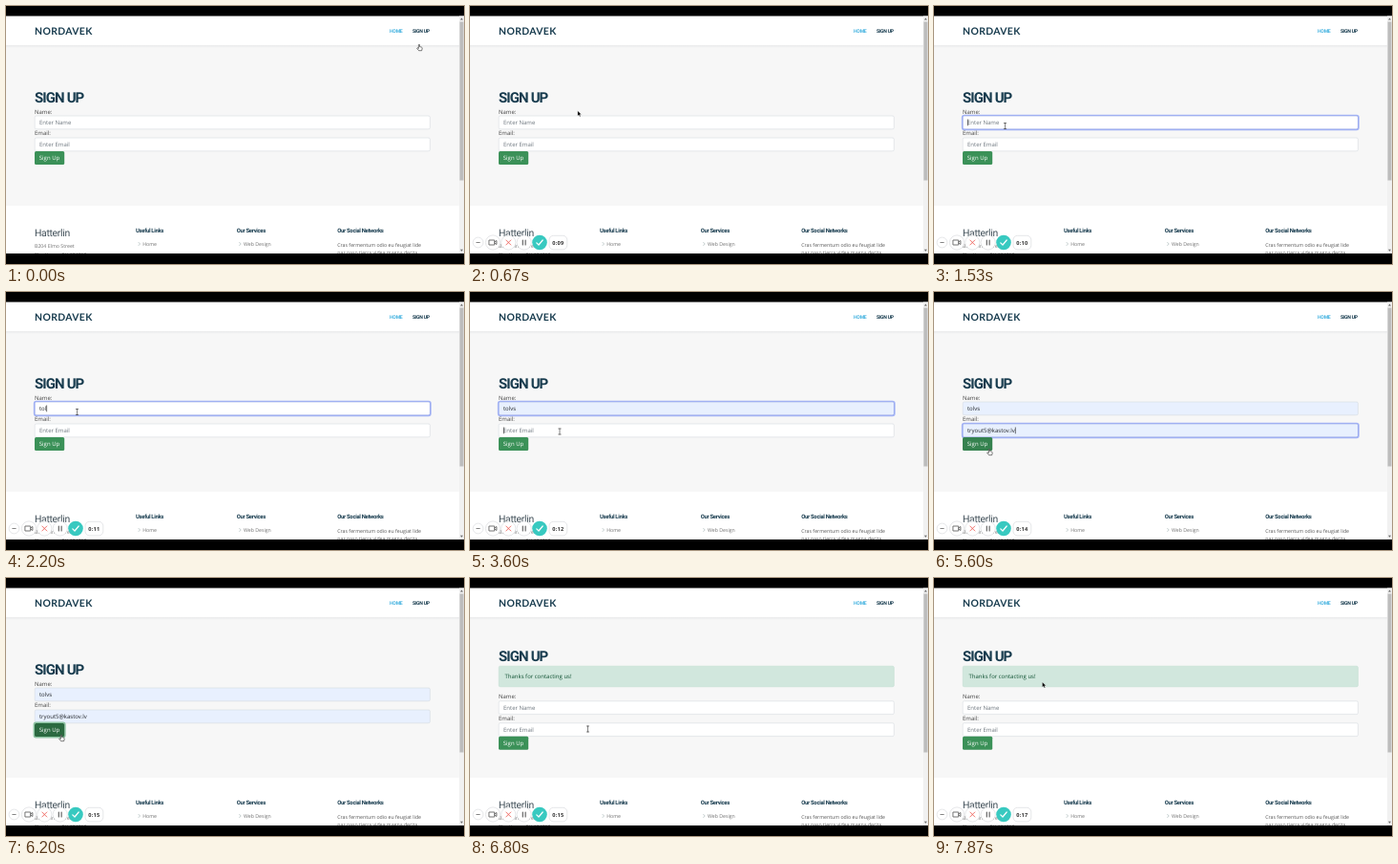
Recreate the animation shown at these times as an HTML page. Size 480 by 270 pixels, loop 8000 ms.

```html
<!DOCTYPE html>
<html lang="en">
<head>
<meta charset="utf-8">
<title>Sign up form</title>
<style>
html, body { margin: 0; height: 100%; overflow: hidden; background: #000; }
svg { display: block; width: 100%; height: 100%; text-rendering: geometricPrecision; }
text { font: 6px "Open Sans", sans-serif; fill: #444; }
.round { font-family: Roboto, sans-serif; font-weight: 700; letter-spacing: -.06em; fill: #173b4e; }
text.nav { font-size: 5.2px; }
text.small { font-size: 5.22px; fill: #707070; }
text.hint { fill: #6c757d; }
text.value { fill: #212529; }
.field { fill: #fff; stroke: #ced4da; stroke-width: .5; }
.ring { fill: none; stroke: #5472f5; stroke-opacity: .5; stroke-width: 1.7; }
.chip { fill: #fff; stroke: #d4d6d9; stroke-width: .6; }
.line { fill: none; stroke-width: .9; stroke-linecap: round; stroke-linejoin: round; }
.caret { fill: #111; }
</style>
</head>
<body>
<svg viewBox="0 0 480 270">
  <defs>
    <linearGradient id="shade" x2="0" y2="1">
      <stop stop-color="#e9eaeb"/><stop offset="1" stop-color="#f7f7f7"/>
    </linearGradient>
  </defs>

  <!-- page -->
  <rect width="480" height="270"/>
  <rect y="10.5" width="480" height="248.5" fill="#fff"/>
  <rect y="41" width="475" height="168" fill="#f7f7f7"/>
  <rect y="41" width="475" height="3" fill="url(#shade)"/>
  <text x="30" y="29.8" style="font:700 10.4px Lato,sans-serif;letter-spacing:.37px;fill:#173b4e">NORDAVEK</text>
  <text class="round nav" x="402" y="27.7" style="fill:#45b3e0">HOME</text>
  <text class="round nav" x="426" y="27.7">SIGN UP</text>

  <!-- form -->
  <text id="title" class="round" x="30" style="font-size:15px">SIGN UP</text>
  <g id="alert">
    <rect x="30.2" y="92.2" width="414.2" height="21.6" rx="1.5" fill="#d1e7dd" stroke="#badbcc" stroke-width=".5"/>
    <text x="36.5" y="105.2" style="fill:#0f5132">Thanks for contacting us!</text>
  </g>
  <g id="form">
    <text x="30" y="112.6">Name:</text>
    <rect id="nameBox" class="field" x="30.2" y="115" width="414.2" height="13.8" rx="1.5"/>
    <rect id="nameRing" class="ring" x="29.7" y="114.5" width="415.2" height="14.8" rx="2"/>
    <text id="nameHint" class="hint" x="35" y="124.1">Enter Name</text>
    <text id="name" class="value" x="35" y="124.1"></text>
    <rect id="nameCaret" class="caret" y="118.5" width=".6" height="6.8"/>
    <text x="30" y="135.4">Email:</text>
    <rect id="mailBox" class="field" x="30.2" y="138" width="414.2" height="13.8" rx="1.5"/>
    <rect id="mailRing" class="ring" x="29.7" y="137.5" width="415.2" height="14.8" rx="2"/>
    <text id="mailHint" class="hint" x="35" y="147.1">Enter Email</text>
    <text id="mail" class="value" x="35" y="147.1"></text>
    <rect id="mailCaret" class="caret" y="141.5" width=".6" height="6.8"/>
    <rect id="buttonRing" x="29.3" y="151.3" width="32.6" height="15.4" rx="2.2" fill="none" stroke="#8cc3a1" stroke-width="1.5"/>
    <rect id="button" x="30" y="152" width="31.2" height="14" rx="1.5"/>
    <text x="34.8" y="161.2" style="fill:#fff">Sign Up</text>
  </g>

  <!-- footer -->
  <text x="30" y="241" style="font:400 10.4px Roboto,sans-serif;letter-spacing:-.03em;fill:#3d4c55">Hatterlin</text>
  <text class="small" x="30" y="253">B204 Elmo Street</text>
  <text class="small" x="30" y="261.8">Elm Haven, EH 604818</text>
  <text class="round" x="136" y="236.8">Useful Links</text>
  <text class="round" x="241.8" y="236.8">Our Services</text>
  <text class="round" x="347.3" y="236.8">Our Social Networks</text>
  <path class="line" d="M139 247.4l1.5 1.6-1.5 1.6M244.7 247.4l1.5 1.6-1.5 1.6" stroke="#9aa" style="stroke-width:.6"/>
  <text class="small" x="143.2" y="251">Home</text>
  <text class="small" x="249" y="251">Web Design</text>
  <text class="small" x="347.3" y="251.8" style="fill:#555">Cras fermentum odio eu feugiat lide</text>
  <text class="small" x="347.3" y="259.8" style="fill:#555">par naso tierra videa magna derita</text>
  <rect y="259" width="480" height="11"/>

  <!-- scrollbar -->
  <rect x="475" y="10.5" width="5" height="248.5" fill="#f1f1f1"/>
  <rect x="475.5" y="16.5" width="4" height="166" fill="#bdbdbd"/>
  <path d="M476 14.6h3l-1.5-2zM476 254.8h3l-1.5 2z" fill="#666"/>

  <!-- recorder bar -->
  <g id="bar">
    <circle class="chip" cx="8.5" cy="247.5" r="5.4"/>
    <circle class="chip" cx="24" cy="247.5" r="7.6"/>
    <circle class="chip" cx="40.3" cy="247.5" r="7.6"/>
    <circle class="chip" cx="56.7" cy="247.5" r="7.6"/>
    <circle cx="73" cy="247.5" r="7.8" fill="#38c9c0"/>
    <rect class="chip" x="83" y="240.3" width="18.8" height="14.6" rx="4.5"/>
    <path class="line" d="M6.8 247.5h3.4" stroke="#777"/>
    <path class="line" d="M20.3 245h5.4v5h-5.4zM25.7 247l2.2-1.5v4l-2.2-1.5" stroke="#666"/>
    <path class="line" d="M37.8 245l5 5m0-5l-5 5" stroke="#f0645c"/>
    <path class="line" d="M55.3 245v5m2.8-5v5" stroke="#666" style="stroke-width:1.2"/>
    <path class="line" d="M69.8 247.8l2.2 2.2 4.2-5" stroke="#fff" style="stroke-width:1.2"/>
    <text id="clock" x="92.4" y="249.6" text-anchor="middle" style="font-size:5.6px;font-weight:700;letter-spacing:.3px;fill:#333"></text>
  </g>

  <!-- pointers, hot spot at 0,0 -->
  <g id="pointer">
    <path id="arrow" d="M0 0v5.3l1.3-1.1.9 1.9.9-.4-.9-1.9h1.7z" fill="#000" stroke="#fff" stroke-width=".3"/>
    <path id="beam" class="line" d="M-1.2-3h2.4M0-3v6M-1.2 3h2.4" stroke="#333" style="stroke-width:.6"/>
    <path id="hand" d="M-.6 0q.6-.6 1.1 0v2.1l2 .5q.8.3.7 1.2l-.5 2.4h-3.1l-1.9-2.4q.1-.7.9-.4l.8.6z" fill="#fff" stroke="#222" stroke-width=".6"/>
  </g>
</svg>

<script>
const $ = id => document.getElementById(id);
const show = (id, on) => $(id).style.display = on ? '' : 'none';
const clamp = v => Math.max(0, Math.min(1, v));
const ramp = (t, start) => clamp((t - start) / 150);

const LOOP = 8000, FOCUS_NAME = 1270, FOCUS_MAIL = 3600, PRESS = 5930, RELOAD = 6350;
const USER = 'tolvs', MAIL = 'tryout5@kastov.lv';
const KEYS = [1870, 2130, 2200, 2600, 2800];

// time, x, y, pointer shape until the next point
const PATH = [
  [0, 433, 40.5, 'hand'], [70, 433, 40.5, 'arrow'], [800, 84, 116, 'beam'],
  [870, 79, 122, 'beam'], [1000, 79, 122, 'beam'], [1130, 74.5, 125.5, 'beam'],
  [3130, 74.5, 125.5, 'beam'], [3580, 94, 146, 'beam'], [4530, 94, 146, 'beam'],
  [4660, 85, 188, 'beam'], [4730, 85, 188, 'arrow'], [5330, 57, 163, 'hand'],
  [5600, 58, 164.5, 'hand'], [6600, 58, 164.5, 'arrow'], [6700, 90, 161, 'beam'],
  [6800, 123.5, 158, 'beam'], [6930, 122, 150, 'arrow'], [7470, 125, 108, 'arrow'],
  [7800, 125, 111, 'arrow'], [7860, 113.5, 109, 'arrow'], [LOOP, 113.5, 109, 'arrow']
];

function movePointer(t) {
  const i = PATH.findIndex(p => p[0] > t);
  const [t0, x0, y0, shape] = PATH[i - 1], [t1, x1, y1] = PATH[i];
  const p = (t - t0) / (t1 - t0), e = p * p * (3 - 2 * p);
  $('pointer').setAttribute('transform', `translate(${x0 + (x1 - x0) * e} ${y0 + (y1 - y0) * e})`);
  for (const id of ['arrow', 'beam', 'hand']) show(id, id === shape);
}

function drawField(id, text, filled, ring, caretOn) {
  $(id).textContent = text;
  show(id + 'Hint', !text);
  $(id + 'Box').style.fill = filled ? '#e8f0fe' : '#fff';
  $(id + 'Ring').style.opacity = ring;
  show(id + 'Caret', caretOn);
  $(id + 'Caret').setAttribute('x', 35.2 + (text ? $(id).getComputedTextLength() : 0));
}

// the caret restarts its blink at each listed time
function blink(t, from, to, resets) {
  const last = [from, ...resets].filter(r => r <= t).pop();
  return t >= from && t < to && (t - last) % 1060 < 530;
}

function draw(t) {
  const done = t >= RELOAD;
  $('title').setAttribute('y', done ? 87.4 : 101.4);
  $('form').setAttribute('transform', `translate(0 ${done ? 13.8 : 0})`);
  show('alert', done);

  const typed = done ? '' : USER.slice(0, KEYS.filter(k => k <= t).length);
  drawField('name', typed, t >= 3200 && !done,
    ramp(t, FOCUS_NAME) * (1 - ramp(t, FOCUS_MAIL)),
    blink(t, FOCUS_NAME, FOCUS_MAIL, KEYS));

  const filled = t >= 3930 && !done;
  drawField('mail', filled ? MAIL : '', filled,
    ramp(t, FOCUS_MAIL) * (1 - ramp(t, PRESS)),
    blink(t, FOCUS_MAIL, PRESS, [3930, 4200]));

  const hover = done ? 0 : ramp(t, 5400), press = done ? 0 : ramp(t, PRESS);
  $('button').style.fill = `hsl(140 42% ${40 - 4 * hover - 7 * press}%)`;
  $('buttonRing').style.opacity = press;

  show('bar', t >= 270 && !(done && t < 6550));
  const seconds = 10 + Math.floor((t - 870) / 1000);
  $('clock').textContent = '0:' + String(seconds).padStart(2, '0');
  movePointer(t);
}

function tick() {
  draw(performance.now() % LOOP);
  requestAnimationFrame(tick);
}
tick();
</script>
</body>
</html>
```
